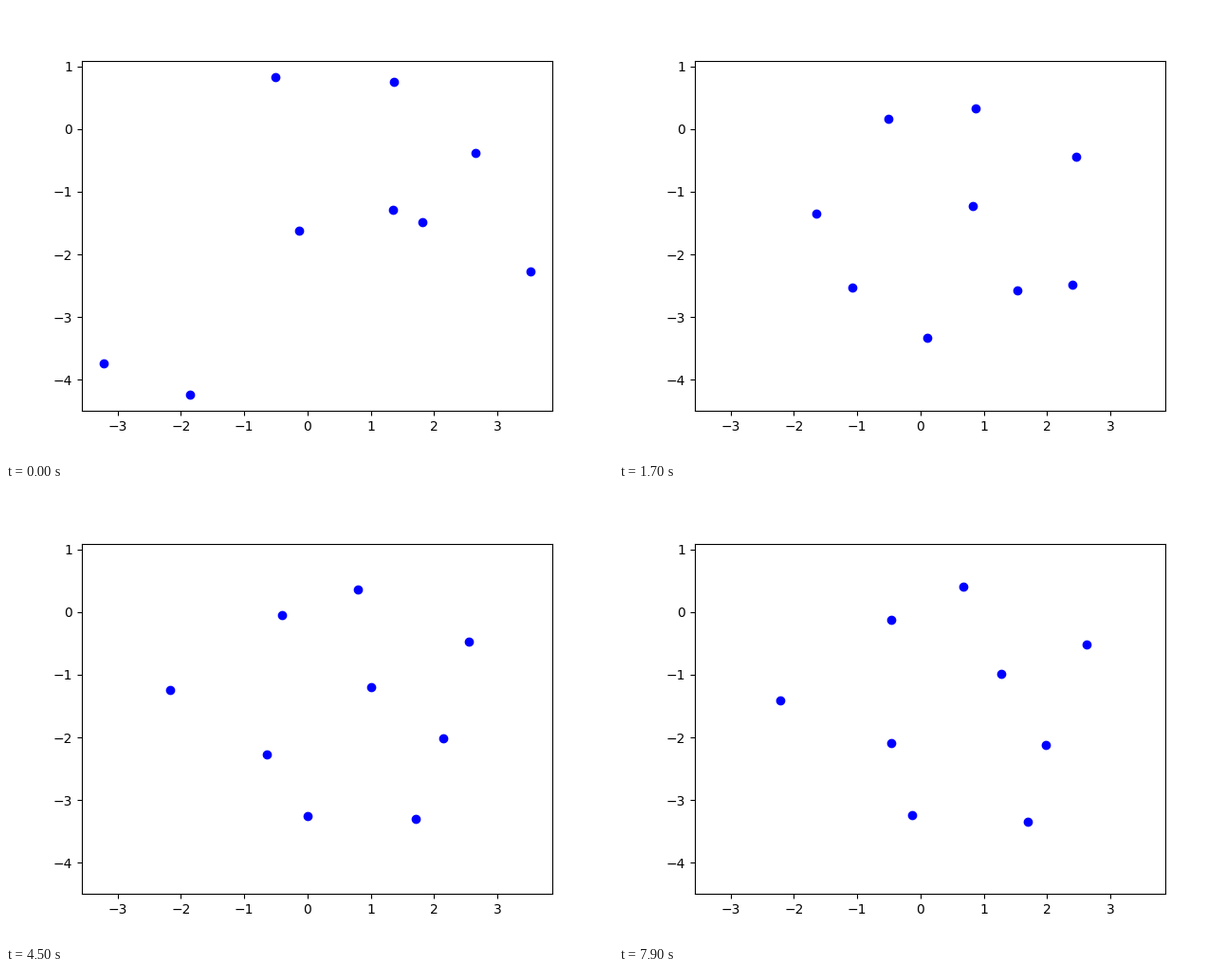
Recreate the animation shown at these times as a matplotlib script. Size 640 px wide and 480 px high, loop 8 s.

```python
import numpy as np
import matplotlib.pyplot as plt
from matplotlib.animation import FuncAnimation

FRAMES, INTERVAL = 80, 100
XLIM, YLIM = (-3.562, 3.869), (-4.495, 1.09)
SETTLE, DECAY = 6, 0.5

# Stage pixels: start, then waypoints at KNOTS
KNOTS = [6, 17, 31, 45, 69, 79]
PATHS = [
    [(284, 75), (278, 112), (284, 119), (291, 128), (291, 133), (289, 137), (287, 138)],
    [(409, 80), (379, 104), (376, 108), (374, 108), (371, 106), (366, 104), (363, 103)],
    [(495, 155), (477, 159), (482, 159), (485, 161), (488, 161), (491, 162), (493, 164)],
    [(408, 215), (371, 223), (373, 211), (379, 208), (385, 209), (396, 201), (403, 195)],
    [(439, 228), (428, 270), (420, 300), (425, 337), (432, 348), (432, 350), (431, 351)],
    [(309, 237), (272, 246), (208, 219), (177, 211), (173, 212), (170, 218), (170, 223)],
    [(553, 280), (489, 294), (478, 294), (470, 269), (461, 263), (454, 268), (450, 270)],
    [(103, 377), (208, 296), (246, 297), (269, 289), (275, 280), (283, 272), (287, 268)],
    [(194, 410), (290, 351), (325, 350), (323, 346), (318, 345), (312, 345), (309, 344)],
]
# Additional (time, point) for the two sharpest paths
EXTRA = {5: (27, (180, 212)), 6: (9, (483, 295))}


def slopes(t, p):
    """Monotone cubic slopes with parabolic ends."""
    h = np.diff(t)
    d = np.diff(p) / h
    m = np.zeros(len(t))
    for i in range(1, len(d)):
        a, b = d[i - 1], d[i]
        if a * b > 0:
            w1, w2 = 2 * h[i] + h[i - 1], h[i] + 2 * h[i - 1]
            m[i] = (w1 + w2) / (w1 / a + w2 / b)
    m[0] = ((2 * h[0] + h[1]) * d[0] - h[0] * d[1]) / (h[0] + h[1])
    m[-1] = ((2 * h[-1] + h[-2]) * d[-1] - h[-1] * d[-2]) / (h[-1] + h[-2])
    return m


def drift(n, t, p, m):
    """Cubic Hermite curve through the waypoints."""
    i = np.clip(np.searchsorted(t, n, side="right") - 1, 0, len(t) - 2)
    h = t[i + 1] - t[i]
    s = (n - t[i]) / h
    ease = s * s * (3 - 2 * s)
    return (p[i] + (p[i + 1] - p[i]) * ease
            + h * (m[i] * s * (1 - s) ** 2 + m[i + 1] * s * s * (s - 1)))


def track(start, t, p):
    """Quick exponential settling, then slow drift."""
    n = np.arange(FRAMES)
    m = slopes(t, p)
    line = p[0] + m[0] * (n - SETTLE)
    rest = np.exp(-DECAY * SETTLE)
    fade = (np.exp(-DECAY * n) - rest) / (1 - rest)
    return np.where(n < SETTLE, line + (start - line[0]) * fade, drift(n, t, p, m))


def build(k, path):
    way = list(zip(KNOTS, path[1:]))
    if k in EXTRA:
        way = sorted(way + [EXTRA[k]])
    t = np.array([w[0] for w in way], float)
    p = np.array([w[1] for w in way], float)
    return [track(path[0][axis], t, p[:, axis]) for axis in (0, 1)]


pos = np.array([build(k, path) for k, path in enumerate(PATHS)])
xs = np.interp(pos[:, 0], (80, 576), XLIM)
ys = np.interp(pos[:, 1], (57.6, 427.2), YLIM[::-1])

fig, ax = plt.subplots(figsize=(6.4, 4.8), dpi=100)
ax.set(xlim=XLIM, ylim=YLIM)
dots, = ax.plot(xs[:, 0], ys[:, 0], "bo")


def update(n):
    dots.set_data(xs[:, n], ys[:, n])
    return dots,


anim = FuncAnimation(fig, update, frames=FRAMES, interval=INTERVAL, repeat=True)
plt.show()
```
